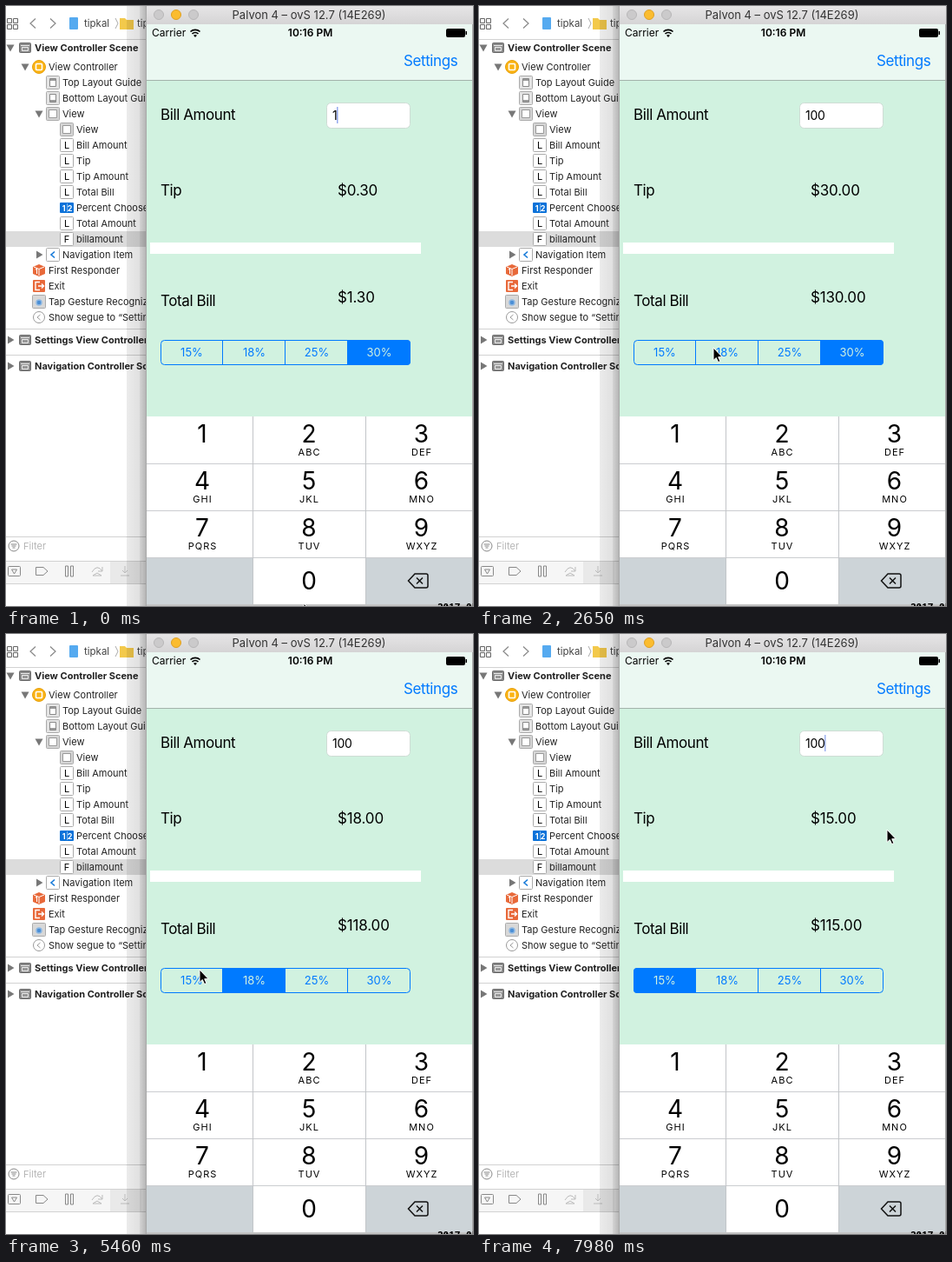
These frames come from a looping animation (538 by 690 pixels, 8 s). An HTML page with a canvas:

```html
<!DOCTYPE html>
<html>
<head>
<meta charset="utf-8">
<style>
html, body { margin: 0; width: 100%; height: 100%; overflow: hidden; background: #fff; }
canvas { display: block; }
</style>
</head>
<body>
<canvas id="stage" width="538" height="690"></canvas>
<script>
const c = document.getElementById('stage').getContext('2d');
const LOOP = 8000, STEP = 147.7;
const BLUE = '#007aff', GREEN = '#d1f2e0', GREY = '#cdd4d8';

// [step, x, y] stops of the pointer tip
const POINTER = [
  [0, 343, 687], [2, 330, 668], [5, 329, 667], [7, 329, 667], [9, 350, 620], [12, 430, 470],
  [14, 460, 400], [15, 443, 396], [16, 400, 396], [18, 270, 393], [19, 273, 398], [21, 356, 399],
  [26, 356, 398], [28, 356, 398], [31, 290, 398], [36, 284, 398], [37, 223, 386], [39, 218, 395],
  [42, 218, 395], [43, 223, 385], [45, 350, 250], [46, 410, 196], [48, 425, 212], [50, 432, 222],
  [52, 460, 226], [53, 470, 225], [55, 470, 225]
];
const RATES = [15, 18, 25, 30];
// [step, index of the chosen rate]
const CHOICES = [[0, 3], [26, 2], [33, 1], [39, 0]];

function text(s, x, y, size, { color = '#000', weight = 400, align = 'left', gap = 0, font = 'Inter' } = {}) {
  c.font = `${weight} ${size}px ${font}, sans-serif`;
  c.letterSpacing = gap + 'px';
  c.textAlign = align;
  c.fillStyle = color;
  c.fillText(s, x, y);
}
function rect(x, y, w, h, color) {
  c.fillStyle = color;
  c.fillRect(x, y, w, h);
}
function paint(fill, stroke, width = 1) {
  if (fill) { c.fillStyle = fill; c.fill(); }
  if (stroke) { c.strokeStyle = stroke; c.lineWidth = width; c.stroke(); }
}
function box(x, y, w, h, r, fill, stroke, width) {
  c.beginPath();
  c.roundRect(x, y, w, h, r);
  paint(fill, stroke, width);
}
function circle(x, y, r, fill, stroke, width) {
  c.beginPath();
  c.arc(x, y, r, 0, 7);
  paint(fill, stroke, width);
}
// SVG path data placed at x, y
function path(x, y, d, fill, stroke, width) {
  c.save();
  c.translate(x, y);
  const p = new Path2D(d);
  if (fill) { c.fillStyle = fill; c.fill(p); }
  if (stroke) { c.strokeStyle = stroke; c.lineWidth = width || 1; c.stroke(p); }
  c.restore();
}
function gradient(x0, y0, x1, y1, ...colors) {
  const g = c.createLinearGradient(x0, y0, x1, y1);
  colors.forEach((color, i) => g.addColorStop(i / (colors.length - 1), color));
  return g;
}

const tile = (x, y, fill = '#fff') => box(x - 7.5, y - 7.5, 15, 15, 1, fill, '#aaa');
const letter = s => (x, y) => {
  tile(x, y);
  text(s, x, y + 4, 11, { align: 'center' });
};
const guide = dy => (x, y) => {
  tile(x, y, '#e4e4e4');
  box(x - 3.5, y - 4.5, 7, 9, 0, '#fff', '#888');
  rect(x - 3, y + dy, 6, 2, '#999');
};
const icons = {
  scene(x, y) {
    box(x - 6.5, y - 5.5, 13, 11, 1, '#8a8a8a', '#6a6a6a');
    rect(x - 5, y - 3, 10, 1, '#eee');
    box(x - 3.5, y - .5, 7, 4, 0, '#999', '#eee');
  },
  controller(x, y) {
    circle(x, y, 7.5, '#fbb416', '#e69f0a');
    box(x - 3.5, y - 3.5, 7, 7, 1, null, '#fff', 1.6);
  },
  top: guide(-4),
  bottom: guide(2),
  view(x, y) {
    tile(x, y, '#d5d5d5');
    box(x - 4.5, y - 4.5, 9, 9, 0, '#fff', '#999');
  },
  L: letter('L'),
  F: letter('F'),
  segments(x, y) {
    box(x - 8, y - 6, 16, 12, 1, '#0b72d9');
    rect(x, y - 5, 1, 10, '#7ab5ee');
    text('1 2', x + .5, y + 3.5, 9, { color: '#fff', weight: 700, align: 'center' });
  },
  nav(x, y) {
    tile(x, y);
    path(x, y, 'M2-3.500L-2 0L2 3.500', null, '#1679d8', 1.6);
  },
  cube(x, y) {
    path(x, y, 'M-7-4L0-7L7-4V4L0 7L-7 4Z', '#e8693a');
    path(x, y, 'M-6-4L0-1.500L6-4M0-1V6', null, '#fff', 1);
    text('1', x - 3, y + 4, 7, { color: '#fff', weight: 700, align: 'center' });
  },
  exit(x, y) {
    box(x - 7, y - 7, 14, 14, 1, '#e8693a');
    path(x, y, 'M1-4.500H-4V4.500H1M-1 0H5M3-2.500L5.500 0L3 2.500', null, '#fff', 1.4);
  },
  tap(x, y) {
    tile(x, y, '#d8d8d8');
    circle(x, y + 1, 3, '#4b8fd6', '#8fb8e2', 1.5);
  },
  segue(x, y) {
    circle(x, y, 6.5, '#fff', '#999');
    path(x, y, 'M1.500-3L-2 0L1.500 3', null, '#999');
  }
};
const OUTLINE = [
  [1, 'controller', 'View Controller'], [2, 'top', 'Top Layout Guide'],
  [2, 'bottom', 'Bottom Layout Guide'], [2, 'view', 'View'], [3, 'view', 'View'],
  [3, 'L', 'Bill Amount'], [3, 'L', 'Tip'], [3, 'L', 'Tip Amount'], [3, 'L', 'Total Bill'],
  [3, 'segments', 'Percent Chooser'], [3, 'L', 'Total Amount'], [3, 'F', 'billamount'],
  [2, 'nav', 'Navigation Item'], [1, 'cube', 'First Responder'], [1, 'exit', 'Exit'],
  [1, 'tap', 'Tap Gesture Recognizer'], [1, 'segue', 'Show segue to “Settings”']
];

function drawEditor() {
  rect(0, 0, 538, 690, '#fff');
  for (const [x, y] of [[1, 14], [8, 14], [1, 21], [8, 21]]) box(x + .5, y + .5, 5, 5, 0, null, '#666');
  path(31, 20, 'M3-5.500L-3 0L3 5.500M20-5.500L26 0L20 5.500', null, '#888', 1.2);
  box(73, 13, 10, 14, 1, '#55aaf0');
  text('tipkal', 90, 24, 11.5, { color: '#444' });
  path(127, 20, 'M-1-6L2 0L-1 6', null, '#aaa');
  path(131, 20, 'M0-6H6L8-4H16V7H0Z', '#f3c94b');
  text('tipkal', 151, 24, 11.5, { color: '#444' });
  for (const y of [38, 371, 401, 610, 638, 664]) rect(0, y, 162, 1, '#d2d2d2');

  rect(0, 259, 162, 18, '#dcdcdc');
  for (const [y, label] of [[48, 'View Controller Scene'], [384, 'Settings View Controller'], [414, 'Navigation Controller Scene']]) {
    icons.scene(22, y);
    text(label, 33, y + 4, 11, { weight: 700, color: '#222' });
  }
  OUTLINE.forEach(([level, icon, label], i) => {
    const y = 70 + 18 * i;
    icons[icon](22 + 16 * level, y);
    text(label, 33 + 16 * level, y + 4, 11, { color: '#222' });
  });
  for (const [x, y] of [[5, 48], [22, 70], [38, 124]]) path(x, y, 'M-4.500-3.500H4.500L0 4.500Z', '#777');
  for (const [x, y] of [[38, 286], [5, 384], [5, 414]]) path(x, y, 'M-3-4.500V4.500L4.500 0Z', '#777');

  circle(9, 621, 6, null, '#888');
  path(9, 621, 'M-3.500-2H3.500M-2.500 0H2.500M-1.500 2H1.500', null, '#888');
  text('Filter', 20, 625, 11, { color: '#b5b5b5' });
  rect(0, 639, 162, 25, '#f6f6f6');
  rect(120, 639, 36, 25, '#e9e9e9');
  box(2.5, 644.5, 14, 11, 1, null, '#888');
  path(9.5, 650, 'M-3-2H3L0 3Z', null, '#888');
  path(41, 650, 'M-6.500-4.500H2L7 0L2 4.500H-6.500Z', null, '#888');
  path(73, 650, 'M-4.500-6H-1.500V6H-4.500ZM1.500-6H4.500V6H1.500Z', null, '#888');
  path(105, 650, 'M-6 1Q0-9 6 0M6-5V0H1M-5 5L0 2L5 5Z', null, '#bbb');
  path(137, 650, 'M0-6V2M-3-1L0 2L3-1M-5 5H5', null, '#bbb');

  // Window shadow, banded
  rect(139, 0, 15, 690, gradient(139, 0, 154, 0, 'rgba(0,0,0,.08)', 'rgba(0,0,0,.12)'));
  rect(154, 0, 8, 690, gradient(154, 0, 162, 0, 'rgba(0,0,0,.17)', 'rgba(0,0,0,.3)'));
}

function drawPhone() {
  rect(161, 0, 377, 690, '#a8a8a8');
  rect(162, 0, 376, 21, gradient(0, 0, 0, 21, '#e6e5e6', '#d5d4d5'));
  circle(176, 10, 5.5, '#cbcacb', '#b8b7b8');
  circle(196, 10, 5.5, '#fbbc2f', '#dfa023');
  circle(216, 10, 5.5, '#cbcacb', '#b8b7b8');
  text('Palvon 4 – ovS 12.7 (14E269)', 349, 15, 13, { align: 'center', color: '#333' });

  rect(162, 21, 375, 451, GREEN);
  rect(162, 21, 375, 64, '#ebf8f2');
  rect(162, 85, 375, 1, '#a3b3ab');
  text('Carrier', 168, 35, 12);
  text('10:16 PM', 350.5, 35, 12, { weight: 600, align: 'center' });
  path(218, 35, 'M-5.500-5.500A8 8 0 0 1 5.500-5.500M-3.500-3A5 5 0 0 1 3.500-3', null, '#000', 1.7);
  path(218, 35, 'M-2-1.200A3 3 0 0 1 2-1.200L0 1Z', '#000');
  box(507, 26, 22, 10, 2, '#000');
  rect(529.5, 29, 1.5, 4, '#000');
  text('Settings', 458, 69, 17, { color: BLUE, gap: -.41 });

  for (const [label, y] of [['Bill Amount', 131], ['Tip', 218], ['Total Bill', 345]]) text(label, 178, y, 17, { gap: -.41 });
  rect(166, 272, 312, 13, '#fff');
  box(369.5, 111.5, 96, 29, 5, '#fff', '#cfdcd5');
}

function drawKeypad(pressed) {
  rect(162, 472, 375, 216, '#fff');
  rect(162, 634, 375, 54, GREY);
  if (!pressed) rect(285, 634, 129, 54, '#fff');
  for (const y of [526, 580, 634]) rect(162, y, 375, 1, '#cbcdd0');
  for (const x of [284, 414]) rect(x, 472, 1, 216, '#c2c5c8');
  const centers = [226, 349, 478.5];
  ['', 'ABC', 'DEF', 'GHI', 'JKL', 'MNO', 'PQRS', 'TUV', 'WXYZ'].forEach((letters, i) => {
    const x = centers[i % 3], y = 502 + 54 * Math.floor(i / 3);
    text(i + 1, x, y, 28, { align: 'center' });
    text(letters, x + .5, y + 15, 11, { align: 'center', gap: 1 });
  });
  text('0', 349, 671, 28, { align: 'center' });
  path(475, 661, 'M-4-8H9Q11-8 11-6V6Q11 8 9 8H-4L-11.500 0ZM-2-3.500L5 3.500M5-3.500L-2 3.500', null, '#111', 1.5);
  rect(162, 688, 376, 2, '#c4c4c4');
  text('2017-05', 497, 695, 11, { weight: 700, font: 'Noto Sans Mono' });
}

function drawRates(step) {
  const [since, chosen] = CHOICES.findLast(([at]) => step >= at);
  c.save();
  c.beginPath();
  c.roundRect(178, 384, 288, 29, 4);
  c.clip();
  rect(178 + 72 * chosen, 384, 72, 29, BLUE);
  if (since && step === since) rect(250 + 72 * chosen, 384, 72, 29, 'rgba(0,122,255,.05)');
  c.restore();
  box(178.5, 384.5, 287, 28, 4, null, BLUE);
  RATES.forEach((rate, i) => {
    if (i) rect(177 + 72 * i, 384, 1, 29, BLUE);
    text(rate + '%', 214 + 72 * i, 403, 13, { align: 'center', color: i === chosen ? GREEN : BLUE });
  });
  return RATES[chosen];
}

function caretAlpha(step) {
  if (step >= 3 && step <= 8) return 1;
  const phase = (step * STEP + 250) % 1000;
  return Math.max(0, Math.min(1, phase / 450, (700 - phase) / 150));
}

function drawPointer(step) {
  const i = POINTER.findIndex(([at]) => at > step);
  const [a, x0, y0] = POINTER[i - 1], [b, x1, y1] = POINTER[i];
  const u = (step - a) / (b - a);
  path(x0 + (x1 - x0) * u, y0 + (y1 - y0) * u,
    'M0 0V14.500L3.300 11.500L5.600 16.600L7.900 15.600L5.700 10.700H10.200Z', '#000', '#fff', 1);
}

function draw(step) {
  drawEditor();
  drawPhone();
  drawKeypad(step === 2 || step === 4 || step === 5);
  const rate = drawRates(step);
  const bill = step < 3 ? 1 : step < 6 ? 10 : 100;
  const tip = bill * rate / 100;
  text(bill, 376, 131, 14, { gap: -.3 });
  const caretX = Math.round(375.5 + c.measureText(bill).width);
  c.globalAlpha = caretAlpha(step);
  rect(caretX, 116, 1.5, 19, '#3f66e0');
  c.globalAlpha = 1;
  text('$' + tip.toFixed(2), 382, 218, 17, { gap: -.15 });
  text('$' + (bill + tip).toFixed(2), 382, 341, 17, { gap: -.15 });
  drawPointer(step);
}

let shown = -1;
function tick() {
  const step = Math.min(54, Math.floor((performance.now() % LOOP + 16) / STEP));
  if (step !== shown) draw(shown = step);
  requestAnimationFrame(tick);
}
tick();
</script>
</body>
</html>
```
